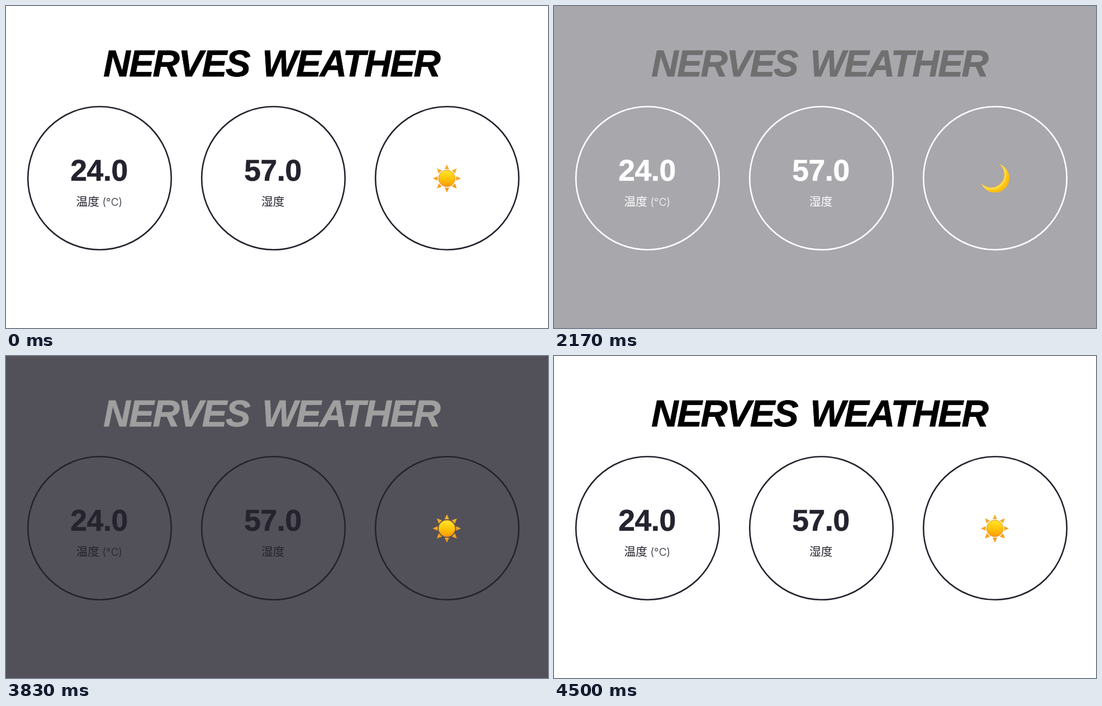
Recreate the animation shown at these times as an HTML page. Size 970x577 px, loop 4.67 s.

```html
<!DOCTYPE html>
<html lang="ja">
<head>
<meta charset="utf-8">
<style>
  html, body { margin: 0; width: 100%; height: 100%; overflow: hidden; }
  svg { display: block; width: 970px; height: 577px; }
  text { font-family: "Liberation Sans", Arial, sans-serif; }
  .title { font-size: 67px; font-weight: bold; font-style: italic; letter-spacing: -2.4px; word-spacing: 7px; stroke-width: .8; }
  .ring { fill: none; stroke: currentColor; stroke-width: 2.6; }
  .value { font-size: 53.5px; font-weight: bold; text-anchor: middle; letter-spacing: -.4px; fill: currentColor; stroke: currentColor; stroke-width: .6; }
  .label { font: 300 20.8px "Noto Sans CJK JP Light", "Noto Sans CJK JP", sans-serif; fill: currentColor; }
  .unit { font: 300 19px Inter, sans-serif; }
</style>
</head>
<body>
<svg id="stage" viewBox="0 0 970 577">
  <defs>
    <linearGradient id="disc" x2="0" y2="1">
      <stop offset="0" stop-color="#ffe62e"/>
      <stop offset=".5" stop-color="#ffc60a"/>
      <stop offset="1" stop-color="#ff9808"/>
    </linearGradient>
    <linearGradient id="rays" gradientUnits="userSpaceOnUse" x1="0" y1="-25" x2="0" y2="25">
      <stop offset="0" stop-color="#f4b32c"/>
      <stop offset="1" stop-color="#f79a1c"/>
    </linearGradient>
    <radialGradient id="glow" gradientUnits="userSpaceOnUse" cx="782.4" cy="301.9" r="33">
      <stop offset=".7" stop-color="#e9a51c"/>
      <stop offset=".74" stop-color="#ffe06a"/>
      <stop offset=".84" stop-color="#ffcb1a"/>
      <stop offset="1" stop-color="#fdbb0c"/>
    </radialGradient>
  </defs>
  <text class="title" id="title" x="174.2" y="126.3">NERVES WEATHER</text>
  <circle class="ring" cx="167.5" cy="308.5" r="128.3"/>
  <circle class="ring" cx="478.5" cy="308.5" r="128.3"/>
  <circle class="ring" cx="789.5" cy="308.5" r="128.3"/>
  <text class="value" x="166.5" y="313.3">24.0</text>
  <text class="value" x="477.5" y="313.3">57.0</text>
  <text class="label" x="125.5" y="358">温度<tspan class="unit"> (°C)</tspan></text>
  <text class="label" x="457" y="358">湿度</text>
  <g id="sun" transform="translate(789 309)">
    <path id="spikes" fill="url(#rays)"/>
    <circle r="14.8" fill="url(#disc)" stroke="#e08a14" stroke-width=".9"/>
  </g>
  <path id="moon" fill="url(#glow)" d="M796 283A26.1 26.1 0 1 1 764 316A23.2 23.2 0 1 0 796 283Z"/>
</svg>
<script>
  const LOOP = 4670, FPS = 6;
  const NIGHT = 1985, DAY = 3700;
  const $ = id => document.getElementById(id);

  const polar = (r, a) => [r * Math.cos(a), r * Math.sin(a)].map(v => v.toFixed(2)).join(" ");
  $("spikes").setAttribute("d", Array.from({ length: 8 }, (_, i) => {
    const a = i * Math.PI / 4;
    return `M${polar(25.3, a)}L${polar(17, a - .24)}L${polar(17, a + .24)}Z`;
  }).join(""));

  // The CSS "ease" curve, cubic-bezier(.25, .1, .25, 1)
  function ease(x) {
    if (x <= 0) return 0;
    if (x >= 1) return 1;
    const bezier = (s, a, b) => 3 * (1 - s) ** 2 * s * a + 3 * (1 - s) * s * s * b + s ** 3;
    let lo = 0, hi = 1;
    for (let i = 0; i < 20; i++) {
      const mid = (lo + hi) / 2;
      if (bezier(mid, .25, .25) < x) lo = mid; else hi = mid;
    }
    return bezier(lo, .1, 1);
  }

  const mix = (from, to, p) => `rgb(${from.map((v, i) => Math.round(v + (to[i] - v) * p))})`;
  const white = [255, 255, 255], black = [0, 0, 0], navy = [36, 35, 46];

  // How dark the theme is, from 0 to 1
  const darkness = (t, start, end, duration) =>
    ease((t - start) / duration) - ease((t - end) / duration);

  function draw(now) {
    // The picture advances six times a second
    const t = Math.floor((now % LOOP + 4) * FPS / 1000) * 1000 / FPS;
    const night = t >= NIGHT && t < DAY;
    const stage = $("stage").style, title = $("title").style;
    stage.background = mix(white, navy, darkness(t, 1975, 3708, 780));
    stage.color = `rgb(${night ? white : navy})`;
    title.fill = title.stroke = mix(black, white, darkness(t, 2011, 3693, 595));
    $("sun").style.display = night ? "none" : "";
    $("moon").style.display = night ? "" : "none";
    requestAnimationFrame(() => draw(performance.now()));
  }
  draw(0);
</script>
</body>
</html>
```
